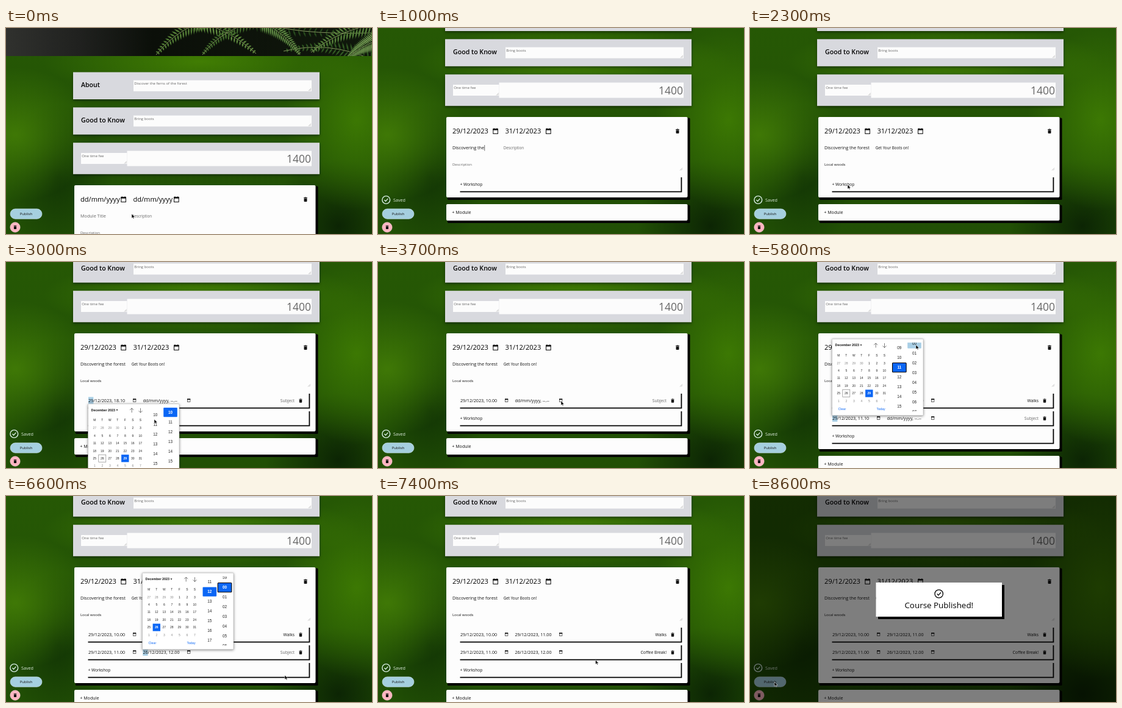
An HTML page that plays this animation: 600 px wide and 338 px high, repeating every 8900 ms.

```html
<!DOCTYPE html>
<html lang="en">
<head>
<meta charset="utf-8">
<title>Course editor</title>
<style>
html, body { margin: 0; width: 100%; height: 100%; overflow: hidden; }
body {
  background:
    radial-gradient(ellipse 130px 110px at 15px 175px, #3f7806 0, #3f780600 100%),
    radial-gradient(ellipse 120px 150px at 575px 150px, #3c7803 0, #3c780300 100%),
    radial-gradient(ellipse 260px 60px at 320px 55px, #417d03 0, #417d0300 100%),
    radial-gradient(ellipse 120px 110px at 545px 325px, #0c2504 0, #0c250400 100%),
    radial-gradient(ellipse 90px 120px at 85px 245px, #123505 0, #12350500 100%),
    linear-gradient(#265805, #214f05);
}
svg { display: block; width: 100%; height: 100%; }
text { font-family: "Open Sans", "Noto Sans", sans-serif; white-space: pre; }
.picker text { font-family: "Liberation Sans", Arial, sans-serif; }
.card { fill: #d8d9de; filter: drop-shadow(0 2px 2px rgba(0, 0, 0, .45)); }
.picker .panel { fill: #fff; stroke: #aaa; stroke-width: .5; filter: drop-shadow(0 1px 2px rgba(0, 0, 0, .45)); }
</style>
</head>
<body>
<svg id="stage" viewBox="0 0 600 338" preserveAspectRatio="none"></svg>
<script>
const LOOP = 8900, TICK = 100;
const INK = '#111', GREY = '#666', BLUE = '#0a66f5', MARK = '#a9cfe6';

const rect = (x, y, w, h, fill, extra = '') =>
  `<rect x="${x}" y="${y}" width="${w}" height="${h}" fill="${fill}" ${extra}/>`;
const text = (x, y, size, str, fill = INK, extra = '') =>
  `<text x="${x}" y="${y}" font-size="${size}" fill="${fill}" ${extra}>${str}</text>`;
const line = (d, stroke = INK, width = 1, extra = '') =>
  `<path d="${d}" fill="none" stroke="${stroke}" stroke-width="${width}" ${extra}/>`;
const group = (x, y, body, extra = '') => `<g transform="translate(${x} ${y})" ${extra}>${body}</g>`;
const MIDDLE = 'text-anchor="middle"', END = 'text-anchor="end"';

const grip = (x, y) => line(`M${x - 4} ${y}l4 -4M${x - 2} ${y}l2 -2`, '#888', .5);
const trash = (x, y, s = 1) => group(x, y,
  `<path transform="scale(${s})" d="M-3 -3.3h1.7l.5 -.6h1.6l.5 .6h1.7v.9h-6zM-2.6 -1.9h5.2v4.9q0 .9 -.9 .9h-3.4q-.9 0 -.9 -.9z" fill="${INK}"/>`);
const calendar = (x, y, s) => group(x, y,
  `<g transform="scale(${s})">${rect(.5, 1.5, 7.4, 7.4, 'none', 'stroke="#111"')}${rect(0, 1, 8.4, 2.3, INK)}${rect(1.4, 0, 1, 2, INK)}${rect(6, 0, 1, 2, INK)}</g>`);
const check = (x, y, r, color, width) =>
  `<circle cx="${x}" cy="${y}" r="${r}" fill="none" stroke="${color}" stroke-width="${width}"/>` +
  line(`M${x - r * .45} ${y}l${r * .33} ${r * .35}l${r * .6} ${-r * .68}`, color, width);

// Ferns: leaflets shrink along a curved stem.
function frond([x0, y0, cx, cy, x1, y1, size, color]) {
  const n = 22;
  let leaves = '';
  for (let i = 0; i < n; i++) {
    const u = i / n, v = 1 - u;
    const x = v * v * x0 + 2 * u * v * cx + u * u * x1;
    const y = v * v * y0 + 2 * u * v * cy + u * u * y1;
    const angle = Math.atan2(v * (cy - y0) + u * (y1 - cy), v * (cx - x0) + u * (x1 - cx)) * 180 / Math.PI;
    const len = size * (1 - u * .85);
    for (const side of [-62, 62])
      leaves += `<path transform="translate(${x.toFixed(1)} ${y.toFixed(1)}) rotate(${(angle + side).toFixed(1)})" d="M0 0Q${len * .4} -2.6 ${len} 0Q${len * .4} 2.6 0 0"/>`;
  }
  return `<g fill="${color}" stroke="#18300f" stroke-width=".4">${leaves}</g>` +
    line(`M${x0} ${y0}Q${cx} ${cy} ${x1} ${y1}`, '#a0b771', .8);
}
const fronds = [
  [410, -12, 470, 12, 600, 8, 18, '#294b20'],
  [600, 52, 530, 20, 455, 38, 19, '#355d27'],
  [345, -18, 285, -4, 246, 44, 22, '#5e873d'],
  [300, -14, 365, 0, 410, 42, 20, '#6b9547'],
  [420, -16, 350, 4, 322, 44, 17, '#476f30'],
  [420, -10, 460, 10, 482, 44, 18, '#68924b'],
  [610, -8, 545, 4, 500, 40, 23, '#608b42'],
  [610, 20, 580, 30, 560, 50, 20, '#779d56'],
];
const header = `<g clip-path="url(#headerClip)">${rect(0, 0, 600, 46, 'url(#headerTone)')}${fronds.map(frond).join('')}</g>`;

const infoCard = (y, title, value) => rect(110, y, 404, 44.5, '', 'class="card"') +
  text(123, y + 24.7, 10.6, title, '#000', 'font-weight="600"') +
  rect(209, y + 13.3, 292, 18, '#fcfcfc') + text(210.3, y + 20.6, 6, value, GREY) + grip(500, y + 30.5);

const block = (id, y, h) => rect(114, y + 1.5, 397.5, h + 2.5, '#000', `rx="1.5" id="${id}Shade"`) +
  rect(112, y, 395.5, h, '#fdfdfd', `rx="2" id="${id}"`);
const frame = line('M134.5 23.6H497.4V0', '#000', 1.8);

const workshop = i => group(0, 357 + 29 * i, frame +
  rect(135, 5.5, 8.3, 11.5, MARK, `id="markA${i}"`) + rect(224.3, 5.5, 8.3, 11.5, MARK, `id="markB${i}"`) +
  text(135, 14, 7.2, '', INK, `id="from${i}"`) + calendar(208, 8, .62) +
  text(224.4, 14, 7.2, '', INK, `id="to${i}"`) + calendar(297, 8, .62) +
  text(473, 14, 6.8, '', INK, `${END} id="subject${i}"`) + trash(483, 11.5, .85), `id="row${i}"`);

const page = header +
  infoCard(72.5, 'About', 'Discover the ferns of the forest') +
  infoCard(130.3, 'Good to Know', 'Bring boots') +
  rect(110, 188.2, 404, 51.6, '', 'class="card"') +
  rect(123, 205, 75.5, 18, '#fcfcfc') + text(124.2, 212.4, 6, 'One time fee', GREY) + grip(198, 222.5) +
  rect(198.5, 201.6, 302.5, 25, '#fcfcfc') + text(500, 221, 17.5, '1400', GREY, END) +
  block('module', 258, 132) +
  text(122, 285, 11.1, '', '#000', 'id="start"') + calendar(188.3, 276.3, 1.03) +
  text(208.4, 285, 11.1, '', '#000', 'id="finish"') + calendar(275, 276.3, 1.03) + trash(491, 281.2, .95) +
  text(122, 311.4, 7.25, '', INK, 'id="title"') + rect(0, 304, .6, 9.5, INK, 'id="caret"') +
  text(205.8, 311.2, 6.25, '', INK, 'id="tagline"') +
  text(122, 338.4, 6, '', INK, 'id="place"') + grip(499, 345.5) +
  workshop(0) + workshop(1) +
  `<g id="addWorkshop">${group(0, 357, frame + text(134.5, 13.6, 6.6, '+ Workshop'))}</g>` +
  `<g id="addModule">${block('more', 401, 27)}${text(121.3, 417, 7.1, '+ Module')}</g>`;

const controls = `<g id="saved">${check(13.3, 282, 6.4, '#d9eee6', 1.4)}${text(25, 284.7, 7.2, 'Saved', '#dcebdc')}</g>` +
  rect(7, 296.8, 52, 16.4, '#a5cfdf', 'rx="8.2" stroke="#d1e6ec" stroke-width=".6"') +
  text(33, 307.2, 6, 'Publish', INK, `${MIDDLE} font-weight="500"`) +
  '<circle cx="15" cy="327" r="8.2" fill="#ffb5c2" stroke="#f8d8dd" stroke-width=".5"/>' + trash(15, 327, .8);

const dialog = `<g id="dialog">${rect(0, 0, 600, 338, '#000', 'opacity=".5"')}${rect(210, 146, 207, 56, '#000')}${rect(206.5, 142, 206.5, 56, '#fff')}` +
  check(309.7, 160.5, 6.7, '#000', 1.3) + text(309.8, 184.3, 13.4, 'Course Published!', '#000', MIDDLE) + '</g>';

document.getElementById('stage').innerHTML = `<defs>
  <clipPath id="headerClip"><rect width="600" height="46"/></clipPath>
  <clipPath id="timeClip"><rect y="6" width="150" height="113"/></clipPath>
  <linearGradient id="headerTone"><stop stop-color="#30312e"/><stop offset=".2" stop-color="#20211f"/><stop offset=".4" stop-color="#0b0f09"/><stop offset="1" stop-color="#10180c"/></linearGradient>
  </defs><g id="page">${page}</g>${controls}<g id="picker" class="picker"></g>${dialog}
  <path id="cursor" d="M0 0V7.2L1.7 5.6 2.8 8.1 4 7.5 2.9 5.2H5.2Z" fill="#000" stroke="#fff" stroke-width=".5"/>`;

// Columns: first visible value, its vertical centre, selected value.
function timeColumn(x, mod, { first, y, sel, focus, hover }) {
  let out = '';
  for (let i = 0; i < 8; i++) {
    const n = (first + i) % mod, cy = y + 16 * i, on = n === sel;
    if (on || n === hover)
      out += rect(x - 11.3, cy - 7.7, 22.6, 15.2, on ? BLUE : MARK, on && focus ? 'rx="1" stroke="#000" stroke-width="1.1"' : 'rx="1"');
    out += text(x, cy + 2.3, 6.4, String(n).padStart(2, '0'), on ? '#fff' : '#222', MIDDLE + (on ? ' font-weight="700"' : ''));
  }
  return out;
}

function drawPicker({ x, y, day, hours, minutes }) {
  let out = rect(0, 0, hours ? 149.5 : 99, 125.5, '', 'class="panel" rx="1"') +
    text(5, 12.2, 5.4, 'December 2023', '#111', 'font-weight="700"') + '<path d="M46 9.2h3l-1.5 2z"/>' +
    line('M71.7 14.3V7M68.7 10l3 -3l3 3M86 7v7.3M83 11.3l3 3l3 -3', '#444', .7);
  [...'MTWTFSS'].forEach((d, i) => out += text(10.8 + 12.5 * i, 28.6, 4.9, d, '#222', MIDDLE));
  for (let i = 0; i < 42; i++) {
    const n = i - 3, inside = n > 0 && n < 32;
    const cx = 10.8 + 12.5 * (i % 7), cy = 39.6 + 12.45 * Math.floor(i / 7);
    const on = n === day;
    if (on) out += rect(cx - 6.2, cy - 6.1, 12.4, 12.2, BLUE);
    else if (n === 26) out += rect(cx - 6, cy - 6, 12, 12, 'none', 'stroke="#777" stroke-width=".6"');
    out += text(cx, cy + 1.8, 5, n < 1 ? n + 30 : inside ? n : n - 31, on ? '#fff' : inside ? '#222' : '#888',
      MIDDLE + (on ? ' font-weight="700"' : ''));
  }
  out += text(10, 117.3, 5.3, 'Clear', BLUE) + text(73, 117.3, 5.3, 'Today', BLUE);
  if (hours) out += `<g clip-path="url(#timeClip)">${timeColumn(110.3, 24, hours)}${timeColumn(135, 60, minutes)}</g>`;
  return group(x, y, out);
}

const col = (first, y, sel, more) => ({ first, y, sel, ...more });
const focus = { focus: true };
const pick = (x, y, day, hours, minutes) => ({ x, y, day, hours, minutes });
const LEFT = 134.5, RIGHT = 223.5, BELOW = 232.8, ABOVE = 126.2;

// Step tables: [time, value from then on].
const pickers = [
  [0, null], [300, pick(121.5, 179, 26)], [400, pick(121.5, 179, 29)], [500, null],
  [600, pick(208, 179, 31)], [700, null],
  [2800, pick(LEFT, BELOW, 29, col(18, 14, 18), col(10, 14, 10))],
  [2900, pick(LEFT, BELOW, 29, col(10, 18, 18), col(10, 14, 10))],
  [3200, pick(LEFT, BELOW, 29, col(10, 14, 10, focus), col(10, 14, 10))],
  [3400, pick(LEFT, BELOW, 29, col(10, 14, 10), col(0, 14, 0, focus))], [3600, null],
  [3800, pick(RIGHT, BELOW, 29, col(18, 14, 18), col(10, 14, 10))],
  [4000, pick(RIGHT, BELOW, 29, col(10, 14, 11, focus), col(10, 14, 10))],
  [4300, pick(RIGHT, BELOW, 29, col(10, 14, 11), col(59, 20, 0, focus))], [4700, null],
  [5400, pick(LEFT, ABOVE, 29, col(18, 14, 18), col(10, 14, 10))],
  [5600, pick(LEFT, ABOVE, 29, col(9, 15, 11, focus), col(4, 14, 10))],
  [5800, pick(LEFT, ABOVE, 29, col(9, 15, 11, focus), col(0, 8, 10, { hover: 0 }))],
  [5900, pick(LEFT, ABOVE, 29, col(9, 15, 11), col(0, 14, 0, focus))], [6000, null],
  [6200, pick(RIGHT, ABOVE, 26, col(18, 14, 18), col(10, 14, 10))],
  [6300, pick(RIGHT, ABOVE, 26, col(11, 15, 12, focus), col(10, 14, 10))],
  [6500, pick(RIGHT, ABOVE, 26, col(11, 15, 12), col(59, 8, 0, focus))], [6700, null],
];
const EMPTY_DAY = 'dd/mm/yyyy', EMPTY = 'dd/mm/yyyy, --.--', D29 = '29/12/2023, ', D26 = '26/12/2023, ';
const values = {
  start: [[0, EMPTY_DAY], [400, '29/12/2023']],
  finish: [[0, EMPTY_DAY], [600, '31/12/2023']],
  from0: [[0, EMPTY], [2800, D29 + '18.10'], [3200, D29 + '10.10'], [3400, D29 + '10.00']],
  to0: [[0, EMPTY], [3800, D29 + '18.10'], [4000, D29 + '11.10'], [4300, D29 + '11.00']],
  from1: [[0, EMPTY], [5400, D29 + '18.10'], [5600, D29 + '11.10'], [5900, D29 + '11.00']],
  to1: [[0, EMPTY], [6200, D26 + '18.10'], [6300, D26 + '12.10'], [6500, D26 + '12.00']],
};
// Typed fields: placeholder, text, first and last key.
const typed = {
  title: ['Module Title', 'Discovering the forest', 700, 1200],
  tagline: ['Description', 'Get Your Boots on!', 1300, 1700],
  place: ['Description', 'Local woods', 1800, 2200],
  subject0: ['Subject', 'Walks', 4800, 5000],
  subject1: ['Subject', 'Coffee Break!', 6900, 7300],
};
const scrolls = [[0, 0], [100, 0], [300, 112], [2300, 112], [2500, 141], [LOOP, 141]];
const pointer = [
  [0, 206, 305], [200, 192, 230], [300, 192, 169], [400, 197, 240], [500, 279, 169], [600, 285, 242], [800, 150, 197],
  [1300, 230, 197], [1800, 150, 224], [2300, 160, 257], [2600, 160, 257], [2700, 211, 229], [2900, 244, 256],
  [3000, 243, 258], [3200, 244, 247], [3400, 270, 247], [3700, 300, 228], [4000, 333, 263], [4300, 359, 271],
  [4500, 359, 271], [4700, 462, 227], [5100, 160, 257], [5300, 210, 257], [5600, 245, 173], [5800, 272, 136],
  [5900, 270, 140], [6100, 299, 257], [6300, 333, 157], [6500, 359, 150], [6600, 457, 294], [6800, 462, 257],
  [7300, 462, 257], [7700, 40, 305], [LOOP, 40, 305],
];

const at = (steps, t) => steps.findLast(s => s[0] <= t)[1];
function between(keys, t) {
  const i = Math.max(1, keys.findIndex(k => k[0] > t));
  const a = keys[i - 1], b = keys[i], u = (t - a[0]) / (b[0] - a[0]);
  return a.slice(1).map((v, j) => v + (b[j + 1] - v) * u);
}
const $ = id => document.getElementById(id);
const show = (id, on) => $(id).style.display = on ? '' : 'none';
const shift = (id, x, y) => $(id).setAttribute('transform', `translate(${x} ${y})`);

function render(t) {
  const [scroll] = between(scrolls, t);
  const rows = t < 2500 ? 0 : t < 5200 ? 1 : 2;
  shift('page', 0, -scroll);
  $('module').setAttribute('height', 132 + 29 * rows);
  $('moduleShade').setAttribute('height', 134.5 + 29 * rows);
  shift('addWorkshop', 0, 29 * rows);
  shift('addModule', 0, 29 * rows);

  for (const id in values) $(id).textContent = at(values[id], t);
  let typing = false;
  for (const id in typed) {
    const [hint, full, first, last] = typed[id];
    const count = Math.round(full.length * Math.min(1, Math.max(0, (t - first + TICK) / (last - first + TICK))));
    $(id).textContent = count ? full.slice(0, count) : hint;
    $(id).setAttribute('fill', count ? INK : GREY);
    if (t >= first && t <= last) typing = true;
  }
  show('caret', t >= 700 && t <= 1200);
  $('caret').setAttribute('x', 122.4 + $('title').getComputedTextLength());

  const open = at(pickers, t);
  $('picker').innerHTML = open ? drawPicker(open) : '';
  for (const i of [0, 1]) {
    show('row' + i, rows > i);
    const active = open && open.hours && i === rows - 1;
    show('markA' + i, active && open.x === LEFT);
    show('markB' + i, active && open.x === RIGHT);
  }
  show('saved', t >= 500);
  show('dialog', t >= 7800);
  show('cursor', !typing);
  shift('cursor', ...between(pointer, t));
}

const origin = performance.now();
let shown = -1;
function tick() {
  const t = Math.floor((performance.now() - origin) % LOOP / TICK) * TICK;
  if (t !== shown) render(shown = t);
  requestAnimationFrame(tick);
}
tick();
</script>
</body>
</html>
```
